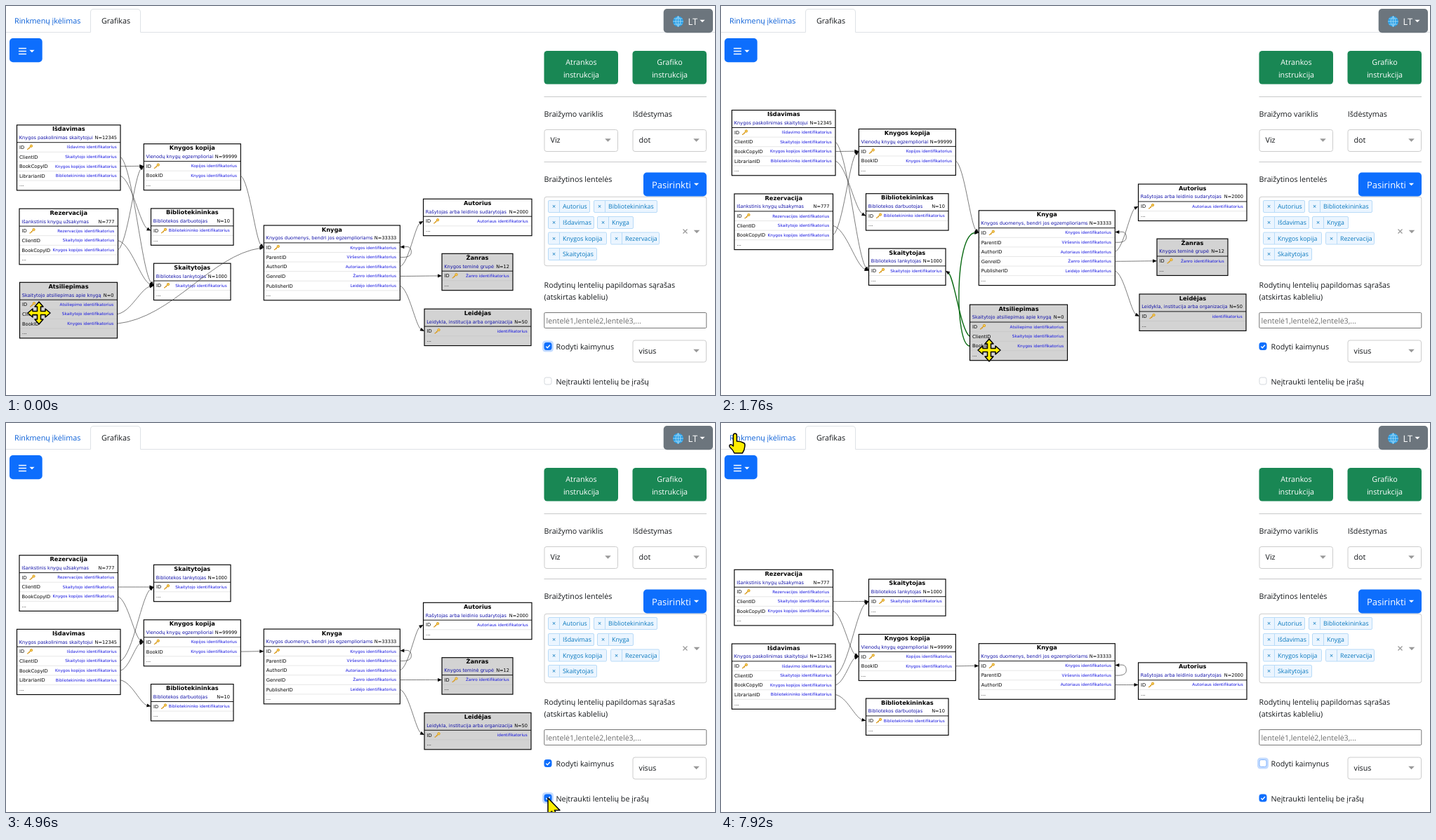
An HTML page that plays this animation: 1010 by 555 pixels, repeating every 8000 ms.

```html
<!DOCTYPE html>
<html lang="lt">
<head>
<meta charset="utf-8">
<style>
html, body { margin: 0; width: 100%; height: 100%; overflow: hidden; background: #fff; }
svg { display: block; width: 1010px; height: 555px; }
text { font-family: "Open Sans", "Noto Sans", sans-serif; fill: #14171a; text-rendering: geometricPrecision; white-space: pre; }
#graph text { font-family: "DejaVu Sans", sans-serif; fill: #000; }
#graph .name { font-weight: bold; }
#graph .about { fill: #1010a8; }
#graph .note { fill: #1414e0; }
</style>
</head>
<body>
<svg id="stage" viewBox="0 0 1010 555"><g id="panel"></g><g id="graph"></g><g id="checks"></g><g id="cursor"></g></svg>
<script>
const $ = id => document.getElementById(id);

// y is the middle of the capitals
const text = (x, y, s, size = 10.75, attrs = '') =>
  `<text x="${x}" y="${y + size * .36}" font-size="${size}" ${attrs}>${s}</text>`;
const rect = (x, y, w, h, fill, stroke = 'none', r = 0, attrs = '') =>
  `<rect x="${x}" y="${y}" width="${w}" height="${h}" rx="${r}" fill="${fill}" stroke="${stroke}" ${attrs}/>`;
const path = (d, stroke, width = 1, fill = 'none', attrs = '') =>
  `<path d="${d}" stroke="${stroke}" stroke-width="${width}" fill="${fill}" ${attrs}/>`;
const caret = (x, y, fill, r = 4.3) => path(`M${x - r} ${y - r / 2}h${2 * r}l${-r} ${r}z`, 'none', 0, fill);
const MID = 'text-anchor="middle" ', END = 'text-anchor="end" ', WHITE = 'style="fill:#fff"';

// ---------- page around the graph ----------
const BLUE = '#0d6efd', CHIP = '#0878be';
const select = (x, y, label) =>
  rect(x, y + .5, 104.5, 31, '#fff', '#ccc', 3) + text(x + 8.5, y + 15.5, label) + caret(x + 90.5, y + 15.5, '#999');
const greenButton = (x, a, b) => rect(x - .5, 64, 105.5, 47.5, '#198754', 'none', 4.5) +
  text(x + 52.5, 80, a, 10.75, MID + WHITE) + text(x + 52.5, 98, b, 10.75, MID + WHITE);
const chip = (x, y, w, label) => rect(x + .5, y - 8.5, w - 1, 17, '#ebf5ff', '#b8dbf8', 1.5) +
  path(`M${x + 16.5} ${y - 8.5}v17`, '#b8dbf8') +
  text(x + 8.5, y, '×', 9, MID + `style="fill:${CHIP}"`) + text(x + 21, y, label, 8.8, `style="fill:${CHIP}"`);
const rule = y => path(`M766.5 ${y}h231.5`, '#c8c9ca');

$('panel').innerHTML =
  path('M0 37.5H120.5V9q0-4.5 4.5-4.5H187q4.5 0 4.5 4.5V37.5H1010', '#dee2e6') +
  text(12, 21.5, 'Rinkmenų įkėlimas', 10.75, 'style="fill:#0b60d8"') + text(136, 21.5, 'Grafikas') +
  rect(936.7, 4, 70.3, 34.3, '#6c757d', 'none', 5) +
  '<circle cx="957.5" cy="22" r="7.5" fill="#2b9fe6"/>' +
  path('M950 22h15M951.5 18h12M951.5 26h12M957.5 14.5v15M957.5 14.5q-7 7.5 0 15q7-7.5 0-15', '#a9dcf7', .8) +
  text(971.5, 22, 'LT', 13, WHITE) + caret(992, 21.5, '#fff', 3.6) +
  rect(5, 46, 46.7, 34.3, BLUE, 'none', 5) + path('M18 60.5h11M18 64.5h11M18 68.5h11', '#fff', 1.3) + caret(37, 64.5, '#fff', 3.6) +
  greenButton(767, 'Atrankos', 'instrukcija') + greenButton(893, 'Grafiko', 'instrukcija') +
  rule(129.5) + text(766.5, 154, 'Braižymo variklis') + text(892.7, 154, 'Išdėstymas') +
  select(767, 176, 'Viz') + select(893, 176, 'dot') +
  rule(222.5) + text(766.5, 247, 'Braižytinos lentelės') +
  rect(767, 272.3, 230.8, 98.4, '#fff', '#ccc', 3) +
  rect(908, 237.5, 90, 34, BLUE, 'none', 5) + text(920, 255, 'Pasirinkti', 13, WHITE) + caret(983.5, 254.5, '#fff', 3.6) +
  chip(772, 286, 60, 'Autorius') + chip(837, 286, 91, 'Bibliotekininkas') +
  chip(772, 309, 66, 'Išdavimas') + chip(842, 309, 52, 'Knyga') +
  chip(772, 331.5, 84, 'Knygos kopija') + chip(861, 331.5, 70, 'Rezervacija') +
  chip(772, 354, 70, 'Skaitytojas') +
  path('M964.5 318.5l6 6m0-6l-6 6', '#999', 1.2) + caret(984, 322, '#999') +
  text(766.5, 398.5, 'Rodytinų lentelių papildomas sąrašas') + text(766.5, 415.5, '(atskirtas kableliu)') +
  rect(766.8, 437.5, 231, 22, '#fff', '#767676', 1.5) +
  text(769.5, 449, 'lentelė1,lentelė2,lentelė3,...', 10.65, 'style="fill:#6c6c6c"') +
  text(783.5, 486, 'Rodyti kaimynus') + select(893, 476.5, 'visus') +
  text(783.5, 536, 'Neįtraukti lentelių be įrašų');

const checkbox = (y, on, focus) =>
  (focus ? rect(764, y - 8, 16, 16, '#c3dbff', 'none', 4.5) : '') +
  rect(767, y - 5, 10, 10, on ? BLUE : '#fff', on ? BLUE : focus ? '#86b7fe' : '#d3d8dd', 2.5) +
  (on ? path(`M769.3 ${y + .2}l2 2 3.6-4`, '#fff', 1.4) : '');

// ---------- tables ----------
const ROW = 13.6, HEAD = 24.9, PORT = 31.7;
const ID = ' identifikatorius';
const tables = {
  isd: [15.5, 147.5, 'Išdavimas', 'Knygos paskolinimas skaitytojui', 12345,
    ['ID', 'Išdavimo'], ['ClientID', 'Skaitytojo'], ['BookCopyID', 'Knygos kopijos'], ['LibrarianID', 'Bibliotekininko']],
  kop: [196.3, 138, 'Knygos kopija', 'Vienodų knygų egzemplioriai', 99999, ['ID', 'Kopijos'], ['BookID', 'Knygos']],
  rez: [19, 140.5, 'Rezervacija', 'Išankstinis knygų užsakymas', 777,
    ['ID', 'Rezervacijos'], ['ClientID', 'Skaitytojo'], ['BookCopyID', 'Knygos kopijos']],
  bib: [206.5, 117.5, 'Bibliotekininkas', 'Bibliotekos darbuotojas', 10, ['ID', 'Bibliotekininko']],
  ska: [210.5, 109.5, 'Skaitytojas', 'Bibliotekos lankytojas', 1000, ['ID', 'Skaitytojo']],
  ats: [19.5, 139, 'Atsiliepimas', 'Skaitytojo atsiliepimas apie knygą', 0,
    ['ID', 'Atsiliepimo'], ['ClientID', 'Skaitytojo'], ['BookID', 'Knygos']],
  kny: [367.3, 194, 'Knyga', 'Knygos duomenys, bendri jos egzemplioriams', 33333,
    ['ID', 'Knygos'], ['ParentID', 'Viršesnis'], ['AuthorID', 'Autoriaus'], ['GenreID', 'Žanro'], ['PublisherID', 'Leidėjo']],
  aut: [594.5, 154.5, 'Autorius', 'Rašytojas arba leidinio sudarytojas', 2000, ['ID', 'Autoriaus']],
  zan: [621, 101, 'Žanras', 'Knygos teminė grupė', 12, ['ID', 'Žanro']],
  lei: [596, 152, 'Leidėjas', 'Leidykla, institucija arba organizacija', 50, ['ID', '']]
};
const links = [
  ['isd', 1, 'ska'], ['isd', 2, 'kop'], ['isd', 3, 'bib'], ['rez', 1, 'ska'], ['rez', 2, 'kop'], ['kop', 1, 'kny'],
  ['ats', 1, 'ska'], ['ats', 2, 'kny'], ['kny', 2, 'aut'], ['kny', 3, 'zan'], ['kny', 4, 'lei']
];
const first = { isd: 169.8, kop: 196.7, rez: 289.2, bib: 288.9, ska: 367.2, ats: 394.3, kny: 313, aut: 275.3, zan: 353.3, lei: 432.2 };
const nonEmpty = { rez: 188.7, ska: 202.3, isd: 294.3, kop: 280.8, bib: 372.6, kny: 294, aut: 256.3, zan: 334.7, lei: 413.4 };
const noNeighbours = { rez: 209.3, ska: 222.8, isd: 315, kop: 301.5, bib: 393, kny: 314.7, aut: 341.9 };

const key = (x, y) => path(`M${x + 5} ${y - 1}l-4 4h-1m2.5-2.5l1.3 1.3`, '#d99a1c', 1.2) +
  `<circle cx="${x + 6}" cy="${y - 1.8}" r="1.7" fill="#f7cf57" stroke="#d99a1c" stroke-width=".9"/>`;

function drawTable(id, x, y, rowCount, lifted) {
  const [, w, name, about, count, ...all] = tables[id];
  const rows = all.slice(0, rowCount);
  const grey = ['ats', 'zan', 'lei'].includes(id);
  const h = HEAD + ROW * (rows.length + 1) + .3;
  let s = lifted ? rect(x + 2.5, y + 2.5, w, h, '#000', 'none', 1, 'opacity=".45" style="filter:blur(1.5px)"') : '';
  s += rect(x, y, w, h, grey ? '#d3d3d3' : '#fff', '#000', 0, 'stroke-width="1.15"') +
    text(x + w / 2, y + 5.6, name, 8.25, MID + 'class="name"') +
    text(x + 3.3, y + 18, about, 6.6, 'class="about"') +
    text(x + w - 5, y + 18, 'N=' + count, 6.6, END) +
    path(`M${x} ${y + HEAD}h${w}`, '#000', .9);
  rows.forEach(([field, note], i) => {
    const cy = y + PORT + ROW * i;
    s += text(x + 3.5, cy, field, 6.7) + text(x + w - 5.3, cy - .2, (note + ID).trim(), 5.75, END + 'class="note"') +
      path(`M${x} ${cy + ROW / 2}h${w}`, '#000', .7, 'none', `opacity="${grey ? .07 : .14}"`);
    if (!i) s += key(x + 14.5, cy);
  });
  return s + text(x + 3.5, y + PORT + ROW * rows.length - 1, '...', 6.7);
}

const arrow = (x, y, angle) =>
  path('M0 0l-6-2.5v5z', 'none', 0, '#000', `transform="translate(${x} ${y}) rotate(${angle * 180 / Math.PI})"`);

// side: 1 leaves or enters at the right edge, -1 at the left edge
function edge(x1, y1, side1, x2, y2, side2, green) {
  const dx = x2 - x1, dy = y2 - y1;
  let a = [x1 + dx * .38, y1 + dy * .08], b = [x2 - dx * .36, y2 - dy * .1];
  if (side1 === side2) {
    const bend = Math.min(x1, x2) - 22;
    a = [bend, y1];
    b = [bend, y2];
  }
  const angle = Math.atan2(y2 - b[1], x2 - b[0]);
  const end = [x2 - 5 * Math.cos(angle), y2 - 5 * Math.sin(angle)];
  return path(`M${x1} ${y1}C${a} ${b} ${end}`, green ? '#0b6b14' : '#444', green ? 1.4 : .7) + arrow(x2, y2, angle);
}

function drawGraph(layout, shift, drag, moved, lifted) {
  const ids = Object.keys(layout), knyRows = layout.zan ? 5 : 3;
  const at = id => id === 'ats'
    ? [tables.ats[0] + drag[0], layout.ats + drag[1] + shift] : [tables[id][0], layout[id] + shift];
  let s = '', lines = '';
  for (const id of ids) if (id !== 'ats') s += drawTable(id, ...at(id), id === 'kny' ? knyRows : 5);
  for (const [from, row, to] of links) {
    if (!(from in layout) || !(to in layout)) continue;
    const [fx, fy] = at(from), [tx, ty] = at(to), fw = tables[from][1], tw = tables[to][1];
    const out = fx + fw < tx ? 1 : -1, into = fx > tx + tw ? 1 : -1;
    lines += edge(out > 0 ? fx + fw : fx, fy + PORT + ROW * row, out,
      into > 0 ? tx + tw : tx, ty + PORT, into, from === 'ats' && moved);
  }
  const [kx, ky] = at('kny'), x = kx + tables.kny[1], top = ky + PORT - 1, low = ky + PORT + ROW;
  lines += path(`M${x} ${low}C${x + 11} ${low + 1} ${x + 16} ${low - 2} ${x + 16} ${low - 7}` +
    `C${x + 16} ${top} ${x + 12} ${top - 1} ${x + 5} ${top}`, '#444', .7) + arrow(x, top, Math.PI);
  return s + lines + ('ats' in layout ? drawTable('ats', ...at('ats'), 5, lifted) : '');
}

// ---------- timeline ----------
const DROP = 1280, HIDE_EMPTY = 4960, HIDE_NEIGHBOURS = 6720, LEAVE = 1960;
const route = [ // time, x, y
  [60, 47, 438], [720, 309, 497], [1040, 382, 491], [1840, 382, 491], [2560, 779, 537], [3600, 779, 537],
  [4240, 772, 535], [5920, 772, 535], [6200, 772, 485], [7080, 772, 485], [7800, 20, 17], [8000, 20, 17]
];
function pointer(t) {
  const i = route.findIndex(p => p[0] >= t);
  if (i < 1) return route[0].slice(1);
  const [a, b] = [route[i - 1], route[i]];
  let u = (t - a[0]) / (b[0] - a[0]);
  if (t > DROP) u = u * u * (3 - 2 * u);
  return [a[1] + (b[1] - a[1]) * u, a[2] + (b[2] - a[2]) * u];
}
const shapes = {
  move: 'M0-16l6 7h-3.5v6.5h6.5v-3.5l7 6-7 6v-3.5h-6.5v6.5h3.5l-6 7-6-7h3.5v-6.5h-6.5v3.5l-7-6 7-6v3.5h6.5v-6.5h-3.5z',
  arrow: 'M0 0V24l5.5-5 4 9 4-2-4-8.5h7.5z',
  hand: 'M-2.5 1q0-3 2.5-3t2.5 3v8q6 0 10 2.5 2 1 1.5 4.5-.5 6-3.5 10H-1q-2-5-6-8-2-3 0-4t4.5 2z'
};

let lastGraph = '';
function draw(t) {
  const [x, y] = pointer(t);
  const [dropX, dropY] = pointer(Math.min(t, DROP));
  const drag = [dropX - 47, dropY - 438];
  const layout = t < HIDE_EMPTY ? first : t < HIDE_NEIGHBOURS ? nonEmpty : noNeighbours;
  const shift = t >= DROP && t < HIDE_EMPTY ? -21.2 : 0;
  const moved = t > 60;
  const graph = drawGraph(layout, shift, drag, moved, moved && t < DROP);
  if (graph !== lastGraph) $('graph').innerHTML = lastGraph = graph;

  $('checks').innerHTML =
    checkbox(485.5, t < HIDE_NEIGHBOURS, !moved || t >= HIDE_NEIGHBOURS) +
    checkbox(535, t >= HIDE_EMPTY, t >= HIDE_EMPTY && t < HIDE_NEIGHBOURS);

  const kind = t < LEAVE ? 'move' : x < 110 && y < 37 ? 'hand' : 'arrow';
  $('cursor').innerHTML = path(shapes[kind], '#000', 1.5, '#ffee00', `transform="translate(${x} ${y})" stroke-linejoin="round"`);
}

const start = performance.now();
function tick() {
  draw((performance.now() - start) % 8000);
  requestAnimationFrame(tick);
}
tick();
</script>
</body>
</html>
```
